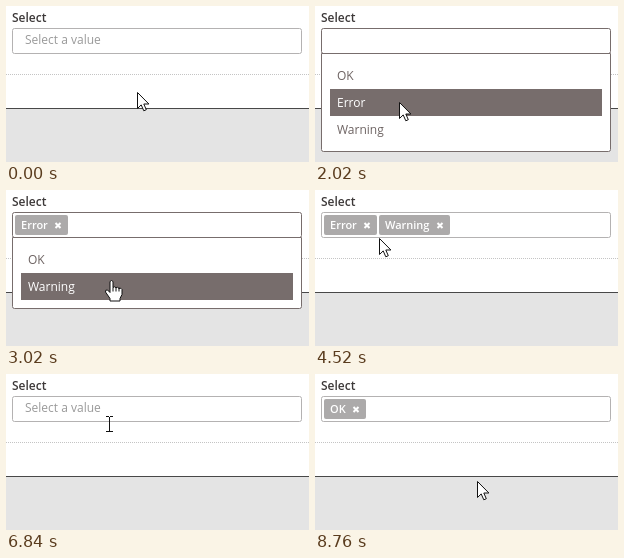
Write an HTML page with a canvas that moves like this. It is 303 px wide and 156 px high and loops after 9.8 s.

```html
<!DOCTYPE html>
<html lang="en">
<head>
<meta charset="utf-8">
<title>Multi select</title>
<style>
  html, body { margin: 0; width: 100%; height: 100%; overflow: hidden; background: #fff; }
  canvas { display: block; width: 303px; height: 156px; }
</style>
</head>
<body>
<canvas id="stage"></canvas>
<script>
const LOOP = 9800, W = 303, H = 156;
const BROWN = '#776d6c', FONT = '"Open Sans", "Noto Sans", sans-serif';
const canvas = document.getElementById('stage');
const ctx = canvas.getContext('2d');
const ratio = window.devicePixelRatio || 1;
canvas.width = W * ratio;
canvas.height = H * ratio;

// Each state holds from its time until the next one.
const states = [
  { at: 0, tags: [] },
  { at: 780, tags: [], focus: true, open: true },
  { at: 2100, tags: ['Error'], focus: true },
  { at: 2480, tags: ['Error'], focus: true, open: true },
  { at: 3100, tags: ['Error', 'Warning'], focus: true },
  { at: 3480, tags: ['Error', 'Warning'] },
  { at: 4940, tags: ['Warning'], focus: true },
  { at: 5480, tags: [], focus: true },
  { at: 6300, tags: [] },
  { at: 7340, tags: [], focus: true, open: true },
  { at: 8280, tags: ['OK'], focus: true },
  { at: 8640, tags: ['OK'] }
];

// Pointer moves: start, end, target x, target y.
const moves = [
  [400, 800, 92, 36],
  [1200, 1760, 84, 96],
  [2120, 2460, 100, 36],
  [2520, 2900, 105, 90],
  [4340, 4740, 52, 36],
  [4980, 5340, 77, 35],
  [5960, 6300, 130, 84],
  [6560, 7000, 91, 36],
  [7680, 8060, 76, 68],
  [8300, 8760, 162, 107]
];

const shapes = [
  [0, 'arrow'], [640, 'beam'], [860, 'arrow'], [2360, 'beam'], [2540, 'arrow'],
  [2840, 'hand'], [3200, 'arrow'], [4700, 'hand'], [5680, 'beam'], [6080, 'arrow'],
  [6820, 'beam'], [7360, 'arrow'], [7960, 'hand'], [8340, 'arrow']
];

const caretOn = [[780, 1240], [1740, 2000], [5680, 6280], [7340, 8280]];

const last = (list, test) => list.filter(test).pop();

function pointerAt(t) {
  let x = 131, y = 86;
  for (const [start, end, tx, ty] of moves) {
    if (t <= start) break;
    const p = Math.min(1, (t - start) / (end - start));
    // A brisk start with a soft landing.
    const e = end === 4740 ? 1 - Math.pow(1 - p, 2.5) : p * p * (3 - 2 * p);
    x += (tx - x) * e;
    y += (ty - y) * e;
  }
  return [Math.round(x), Math.round(y)];
}

function rect(x, y, w, h, color) {
  ctx.fillStyle = color;
  ctx.fillRect(x, y, w, h);
}

function text(str, x, y, color, size = 12, weight = 400) {
  ctx.font = `${weight} ${size}px ${FONT}`;
  ctx.fillStyle = color;
  ctx.fillText(str, x, y);
}

function frame(x, y, w, h, color, radius) {
  ctx.beginPath();
  ctx.roundRect(x + 0.5, y + 0.5, w - 1, h - 1, radius);
  ctx.fillStyle = '#fff';
  ctx.fill();
  ctx.strokeStyle = color;
  ctx.lineWidth = 1;
  ctx.stroke();
}

function page() {
  rect(0, 0, W, H, '#fff');
  rect(0, 102, W, 1, '#484848');
  rect(0, 103, W, H - 103, '#e4e4e4');
  for (let x = 0; x < W; x += 2) rect(x, 68, 1, 1, '#c4c4c4');
  text('Select', 6, 16, '#3c3838', 12, 600);
}

function tag(label, x) {
  const width = { OK: 42, Error: 53, Warning: 71 }[label];
  ctx.beginPath();
  ctx.roundRect(x, 25, width, 20, 2);
  ctx.fillStyle = '#acaaaa';
  ctx.fill();
  text(label, x + 6, 39, '#fff', 11, 600);
  const cx = x + width - 10, cy = 35.5;
  ctx.beginPath();
  ctx.moveTo(cx - 2.5, cy - 2.5);
  ctx.lineTo(cx + 2.5, cy + 2.5);
  ctx.moveTo(cx + 2.5, cy - 2.5);
  ctx.lineTo(cx - 2.5, cy + 2.5);
  ctx.strokeStyle = '#fff';
  ctx.lineWidth = 2;
  ctx.stroke();
  return x + width + 2;
}

function field(state, t) {
  frame(6, 22, 290, 26, state.focus ? BROWN : '#b4b2b2', 2);
  let x = 9;
  for (const label of state.tags) x = tag(label, x);
  if (state.tags.length) return;
  if (!state.focus) text('Select a value', 19, 38, '#999');
  else if (caretOn.some(([a, b]) => t >= a && t < b)) rect(19, 27, 1, 14, '#555');
}

function list(state, py) {
  const options = ['OK', 'Error', 'Warning'].filter(o => !state.tags.includes(o));
  const bottom = 65 + options.length * 27;
  const hover = Math.max(0, Math.min(options.length - 1, Math.floor((py - 56) / 27)));
  frame(6, 47, 290, bottom - 47, BROWN, [0, 0, 2, 2]);
  options.forEach((label, i) => {
    const y = 56 + i * 27;
    if (i === hover) rect(15, y, 272, 27, BROWN);
    text(label, 22, y + 18, i === hover ? '#fff' : '#6e6463');
  });
}

function outline(path) {
  ctx.lineWidth = 1;
  ctx.lineJoin = 'round';
  ctx.fillStyle = '#fff';
  ctx.strokeStyle = '#111';
  ctx.fill(path);
  ctx.stroke(path);
}

const arrowPath = new Path2D('M0 0V16L3.7 12.4L6.3 18.3L8.8 17.2L6.3 11.5H11.4Z');
const handPath = new Path2D(
  'M-1.5 1Q0 -1 1.5 1V7Q3 5.5 4.5 7.2Q6 6 7.5 8Q9.5 7 10.5 9V14L8.5 18V20.5' +
  'H-1.5V18L-6 11.5Q-6.5 9 -4 9.5L-1.5 12Z');

const pointers = {
  arrow() { outline(arrowPath); },
  hand() {
    outline(handPath);
    ctx.beginPath();
    for (const x of [1.5, 4.5, 7.5]) {
      ctx.moveTo(x, 7);
      ctx.lineTo(x, 11);
    }
    ctx.stroke();
  },
  beam() {
    rect(0, -7, 1, 15, '#111');
    for (const y of [-8, 7]) {
      rect(-3, y, 3, 1, '#111');
      rect(1, y, 3, 1, '#111');
    }
  }
};

function draw(t) {
  const state = last(states, s => s.at <= t);
  const shape = last(shapes, s => s[0] <= t)[1];
  const [x, y] = pointerAt(t);
  ctx.setTransform(ratio, 0, 0, ratio, 0, 0);
  page();
  field(state, t);
  if (state.open) list(state, y);
  const shift = shape === 'beam' ? 0 : 0.5;
  ctx.translate(x + shift, y + shift);
  pointers[shape]();
}

const begin = performance.now();
function tick() {
  draw((performance.now() - begin) % LOOP);
  requestAnimationFrame(tick);
}
tick();
</script>
</body>
</html>
```
